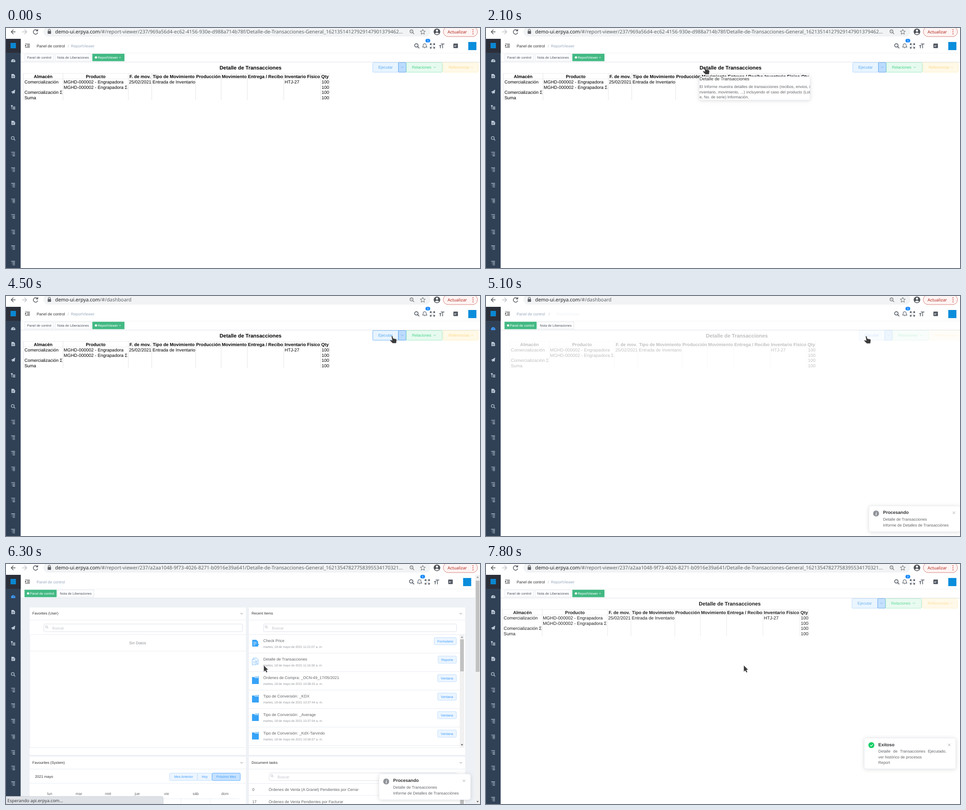
Animation of 1052x532 px, one loop 8 s. Source, as an HTML page:

```html
<!DOCTYPE html>
<html lang="es">
<head>
<meta charset="utf-8">
<title>Detalle de Transacciones</title>
<style>
  html, body { margin: 0; height: 100%; overflow: hidden; background: #fff; }
  svg { display: block; width: 1052px; height: 532px; font-family: "Liberation Sans", Arial, sans-serif; text-rendering: geometricPrecision; }
  .ui { font-family: "Noto Sans", sans-serif; }
  .para { font: 8.68px/11.6px "Liberation Sans", Arial, sans-serif; color: #606266; white-space: nowrap; }
  .para .full { text-align: justify; text-align-last: justify; white-space: normal; }
  .card { filter: drop-shadow(0 1px 4px rgba(0, 0, 0, .14)); }
</style>
</head>
<body>
<svg id="stage" viewBox="0 0 1052 532"></svg>
<script>
const BLUE = '#409eff', INK = '#303133', GREY = '#606266', SOFT = '#909399', LINE = '#e4e8f0';
const MID = 'text-anchor="middle"', BOLD = 'font-weight="700"', END = 'text-anchor="end"';

const text = (x, y, s, size = 8.68, fill = GREY, extra = '') =>
  `<text x="${x}" y="${y}" font-size="${size}" fill="${fill}" ${extra}>${s}</text>`;
const rect = (x, y, w, h, fill, stroke = 'none', rx = 0, extra = '') =>
  `<rect x="${x}" y="${y}" width="${w}" height="${h}" fill="${fill}" stroke="${stroke}" stroke-width=".8" rx="${rx}" ${extra}/>`;
const line = (d, stroke = LINE, width = .8, extra = '') =>
  `<path d="${d}" fill="none" stroke="${stroke}" stroke-width="${width}" ${extra}/>`;
const shape = (d, fill, extra = '') => `<path d="${d}" fill="${fill}" ${extra}/>`;
const circle = (x, y, r, fill, extra = '') => `<circle cx="${x}" cy="${y}" r="${r}" fill="${fill}" ${extra}/>`;
const group = (id, ...parts) => `<g id="${id}">${parts.join('')}</g>`;
const lens = (x, y, r, color, w) =>
  circle(x, y, r, 'none', `stroke="${color}" stroke-width="${w}"`) +
  line(`M${x + r * .7} ${y + r * .7}l${r} ${r}`, color, w);
const chevron = (x, y, color, r = 2.7) => line(`M${x - r} ${y - r / 2}l${r} ${r}l${r} ${-r}`, color);
const cross = (x, y, r, color) => line(`M${x - r} ${y - r}l${2 * r} ${2 * r}m0 ${-2 * r}l${-2 * r} ${2 * r}`, color);
const para = (x, y, w, ...lines) =>
  `<foreignObject x="${x}" y="${y}" width="${w}" height="60"><div class="para">${lines.join('')}</div></foreignObject>`;
const full = s => `<div class="full">${s}</div>`;

function browserBar() {
  const dark = '#5f6368';
  return rect(0, 0, 1052, 24, '#fff') + rect(83, -3, 859, 22, '#f1f3f4', 'none', 11) +
    line('M21 8.5H11.5m5-5l-5 5l5 5', '#50545a', 1.4) +
    line('M36 8.5H46m-5-5l5 5l-5 5', '#bdc1c6', 1.4) +
    line('M69.5 5.5a5 5 0 1 0 1 4.5M70.5 2.5v4h-4', '#50545a', 1.4) +
    rect(92.5, 6.5, 7.5, 6.5, dark, 'none', 1) + line('M94 7V5a2.2 2.2 0 0 1 4.5 0v2', dark, 1.1) +
    lens(900, 7.5, 3.4, dark, 1.1) + line('M898.5 7.5h3', dark) +
    line('M925 3l1.6 3.7 4 .4-3 2.7.9 4-3.5-2.1-3.5 2.1.9-4-3-2.7 4-.4z', dark, 1) +
    circle(956.5, 8.5, 7.3, '#4f5358') + circle(956.5, 6, 2.4, '#fff') + shape('M951.7 12.5q4.8-5 9.6 0q-4.8 3.5-9.6 0', '#fff') +
    rect(970.5, -2.5, 76, 21.5, '#fdf4f3', '#cf5f59', 10.7) +
    text(980, 12, 'Actualizar', 9.3, '#b3261e', 'class="ui"') +
    [4, 8.5, 13].map(y => circle(1036.5, y, 1.1, '#c5221f')).join('') +
    '<text x="109" y="12.4" font-size="10.9" class="ui" fill="#202124">demo-ui.erpya.com<tspan id="path" fill="#5f6368"></tspan></text>';
}

function sidebar() {
  const c = '#bfcbd9', y = i => 72 + i * 34.55;
  const list = i => line(`M11.5 ${y(i) - 4}h8.5m-5.5 2.7h5.5m-5.5 2.7h5.5m-5.5 2.7h5.5`, c, 1.1) +
    line(`M12.2 ${y(i) - 1.3}h1m-1 2.7h1`, c, .8);
  const page = i => shape(`M12 ${y(i) - 4.5}h5l3 3v6h-8z`, c) + line(`M13.5 ${y(i)}h5m-5 2.2h5`, '#304156');
  return rect(0, 24, 32.5, 508, '#304156') + rect(0, 24, 32.5, 31, '#2b2f3a') + rect(10, 33, 12, 12, '#0b87d1') +
    `<g id="gauge">${shape(`M11.5 ${y(0) + 3.5}a4.8 4.8 0 1 1 9 0z`, 'currentColor')}</g>` +
    line(`M16 ${y(0) + 2}l1.5-4M13 ${y(0)}h1m4 0h1`, '#304156') + page(1) +
    shape(`M20.5 ${y(2) - 4.5}l-9.5 5.5 3 1.2v3.3l2-2.4 3 1.3z`, c) +
    rect(11, y(3) - 4.5, 4, 2.6, c) + rect(15.5, y(3) - 1.2, 5, 2.2, c) + rect(15.5, y(3) + 2.4, 5, 2.2, c) +
    line(`M12.5 ${y(3) - 2}v5.5h3.500m-3.5-3.5h3.5`, c) +
    page(4) + line(`M16 ${y(4) + 4}l4.5-4`, c, 1.5) + lens(15, y(5) - 1, 3.2, c, 1.3) +
    [6, 7, 8, 9, 10, 11, 12, 13].map(list).join('');
}

function tab(x, w, label, active) {
  return rect(x, 57.4, w, 15.7, active ? '#42b983' : '#fff', active ? '#42b983' : '#d8dce5') +
    (active ? circle(x + 7.5, 65.3, 2.5, '#fff') : '') +
    text(x + (active ? 11.5 : 4.8), 68.1, label, 7.44, active ? '#fff' : '#495060');
}

function header() {
  const c = '#4d545e';
  return rect(32, 24, 1020, 52, '#fff') + line('M32 55.5H1052', '#eef0f4') + line('M32 75.5H1052', '#d8dce5') +
    line('M42.5 35.5h10.5m-6 2.5h6m-6 2.5h6m-10.5 2.5h10.5', INK, 1.2) + shape('M42.5 37v4.5l3-2.2z', INK) +
    text(68, 42.6, 'Panel de control', 8.68, INK, 'id="crumb"') +
    group('crumbLeaf', text(137, 42.6, '/', 8.68, '#b4bac4', 'id="slash"') + text(144, 42.6, 'ReportViewer', 8.68, '#97a8be', 'id="leaf"')) +
    group('tabsReport', tab(42, 63, 'Panel de control'), tab(109, 80, 'Nota de Liberaciones'),
      tab(192, 70.5, 'ReportViewer', true), cross(253, 65.5, 1.2, '#fff')) +
    group('tabsHome', tab(41.5, 70.5, 'Panel de control', true), tab(114.8, 80, 'Nota de Liberaciones')) +
    group('tools', lens(910.8, 38.5, 3.8, c, 1.6),
      line('M924.5 42.5h9.5q-1.5-1.5-1.5-4.5a3.2 3.2 0 0 0-6.5 0q0 3-1.5 4.5m3.8 1.8h2', c, 1.1),
      rect(931, 24, 10.5, 8, '#1989fa', 'none', 4),
      text(936.2, 30.2, '1', 6.2, '#fff', MID + ' id="badge"'),
      line('M941.5 38v-3.5h3.5m3 0h3.5v3.5m0 3.5v3.5h-3.5m-3 0h-3.5v-3.5M941.5 34.5l3.5 3.5m6.5-3.5l-3.5 3.5m3.5 7l-3.5-3.5m-6.5 3.5l3.5-3.5', c, 1.2),
      line('M965 35.5h8m-4 0v9.5M961.5 39h5m-2.5 0v6', c, 1.4),
      rect(993, 34.5, 10, 10, c, 'none', 1), text(994.5, 42, 'A', 6, '#fff', BOLD), text(999, 39.5, 'z', 4, '#fff'),
      rect(1026, 31, 18, 18, '#0a8ddb'));
}

function report() {
  const cols = [38.5, 126.5, 271.5, 323.5, 420.8, 477.5, 535.5, 616.5, 698.5, 717.5];
  const heads = ['Almacén', 'Producto', 'F. de mov.', 'Tipo de Movimiento', 'Producción', 'Movimiento', 'Entrega / Recibo', 'Inventario Físico', 'Qty'];
  const cell = (x, row, s, extra) => text(x, 122.9 + row * 11.6, s, 9.92, '#000', extra);
  const product = 'MGHD-000002 - Engrapadora';
  const pill = (x, w, label, fill, stroke, ink) => rect(x, 76.4, w, 21.6, fill, stroke, 2) + text(x + 12.3, 90, label, 8.68, ink);
  return text(474, 92, 'Detalle de Transacciones', 11.5, '#000', BOLD) +
    line('M38.5 100.5H717.5M38.5 113H717.5', '#e9e9e9') +
    cols.map(x => line(`M${x} 100.5V160`, '#c9c9c9', .8, 'stroke-dasharray="1.3 .8"')).join('') +
    heads.map((s, i) => text((cols[i] + cols[i + 1]) / 2, 110.6, s, 9.92, '#000', MID + ' ' + BOLD)).join('') +
    cell(41, 0, 'Comercialización') + cell(128, 0, product) + cell(273, 0, '25/02/2021') +
    cell(325.3, 0, 'Entrada de Inventario') + cell(618.5, 0, 'HTJ-27') +
    cell(128, 1, product + ' Σ') + cell(41, 2, 'Comercialización Σ') + cell(41, 3, 'Suma') +
    [0, 1, 2, 3].map(r => cell(717, r, '100', END)).join('') +
    pill(814, 57, 'Ejecutar', '#e8f4ff', '#a3d0fd', '#58a9f3') +
    rect(814, 76.4, 57, 21.6, 'none', '#3d97ee', 1, 'id="focus" stroke-dasharray="1.5 1.2"') +
    rect(871, 76.4, 17, 21.6, '#bcdcfd', '#3f92e6', 1) + chevron(879.5, 87, '#5c9fdf') +
    pill(888.7, 79.5, 'Relaciones', '#e7faf0', '#8de5b5', '#45d486') + chevron(951.5, 87, '#45d486') +
    pill(970, 78, 'Referencias', '#fff9e8', '#ffebb8', '#fcd98c') + chevron(1034.5, 87, '#fcd98c');
}

function panel(x, y, h, title) {
  return rect(x, y, 480, h, '#fff') + text(x + 6, y + 15.7, title, 8.06, INK) +
    chevron(x + 470.5, y + 13.5, GREY) + line(`M${x} ${y + 27.5}h480`);
}
const searchBox = (x, y, right) => rect(x, y, right - x, 17, '#fff', '#d5d9e1', 2.5) +
  lens(x + 5.8, y + 6, 2.3, '#a8adb6', .8) + text(x + 18.8, y + 11.6, 'Buscar', 8.4, '#c0c4cc');
const blueButton = (x, y, w, h, label, on) => rect(x, y, w, h, on ? '#c6e2ff' : '#ecf5ff', on ? BLUE : '#b3d8ff', 2) +
  text(x + w / 2, y + h / 2 + 2.7, label, 7.44, BLUE, MID);

function itemIcon(kind, y) {
  const c = '#36a3f7', pale = '#7dbdf8';
  if (kind === 'Ventana')
    return shape(`M546 ${y + 12}h6v2h9v13.5h-15z`, c) + rect(553.5, y + 11, 3, 2, c) + rect(558, y + 11, 3, 2, c);
  if (kind === 'Formulario')
    return shape(`M546.5 ${y + 11.5}h9l4 4v11h-13z`, c) + line(`M549 ${y + 17}h7m-7 3h7m-7 3h4`, '#fff', 1.2) + line(`M556 ${y + 26}l5-5`, c, 2);
  return line(`M548.5 ${y + 13.5}v-2.5h8l3 3v11h-4M546.5 ${y + 14}h6l2 2v10h-8zM548.5 ${y + 19}h4m-4 3h4`, pale, 1) +
    circle(557.5, y + 20, 2.6, '#fff', `stroke="${pale}"`);
}

function recentItem([title, time, kind, w], i) {
  const y = 156.5 + i * 41;
  return (i === 1 ? rect(539, y, 468, 41, '#f5f7fa', 'none', 0, 'id="hoverRow"') : '') + itemIcon(kind, y) +
    text(571, y + 16.5, title) + text(571, y + 29.6, `martes, 18 de mayo de 2021 ${time} a. m.`, 6.82, SOFT) +
    blueButton(999.5 - w, y + 6.5, w, 16, kind) + line(`M539 ${y + 41}h468`);
}

function scrollbar(x, top, bottom, w, from, to) {
  const mid = x + w / 2;
  return rect(x, top, w, bottom - top, '#f1f1f1') + rect(x + 1, from, w - 2, to - from, '#c1c1c1') +
    shape(`M${mid - 2.5} ${top + 6.5}h5l-2.5-3z`, '#8a8a8a') + shape(`M${mid - 2.5} ${bottom - 6.5}h5l-2.5 3z`, '#505050');
}

function dashboard() {
  const items = [
    ['Check Price', '11:21:07', 'Formulario', 49], ['Detalle de Transacciones', '11:16:30', 'Reporte', 40.5],
    ['Órdenes de Compra: _OCN-49_17/05/2021', '10:38:33', 'Ventana', 41.5], ['Tipo de Conversión: _KDX', '10:37:44', 'Ventana', 41.5],
    ['Tipo de Conversión: _Average', '10:37:04', 'Ventana', 41.5], ['Tipo de Conversión: _KdX-Tarvindo', '10:36:07', 'Ventana', 41.5]];
  const days = ['lun', 'mar', 'mié', 'jue', 'vie', 'sáb', 'dom'];
  const day = (d, i) => text(97 + i * 64.8, 512, d, 8.4, GREY, MID) + line(`M${64.5 + i * 64.8} 540v-19.5h64.8`);
  return rect(0, 76, 1052, 456, '#eef1f5') +
    panel(52.5, 96.5, 326.5, 'Favorites (User)') + searchBox(84, 133, 525) +
    line('M53 156.5H532M53 193H532M53 407H532M53 156.5V407') + text(292, 178, 'Sin Datos', 8.68, SOFT, MID) +
    panel(539, 96.5, 326.5, 'Recent Items') + searchBox(571.5, 133, 1000) + line('M539 156.5H1019M539 407H1019') +
    items.map(recentItem).join('') + scrollbar(1007, 157, 406, 10, 167, 238) +
    panel(52.5, 427, 120, 'Favourites (System)') + text(64.5, 474.3, '2021 mayo', 8.1, INK) +
    blueButton(363, 463.5, 62, 16.5, 'Mes Anterior') + blueButton(425, 463.5, 32, 16.5, 'Hoy') + blueButton(457.5, 463.5, 62.5, 16.5, 'Próximo Mes', true) +
    line('M53 486H532') + days.map(day).join('') +
    panel(539, 427, 120, 'Document tasks') + searchBox(584, 463, 1000) + line('M539 486.5H1019M539 513H1019') +
    text(546.5, 503, '0') + text(583, 503, 'Órdenes de Venta (A Granel) Pendientes por Cerrar') +
    text(546.5, 529.5, '17') + text(583, 529.5, 'Órdenes de Venta Pendientes por Facturar') +
    scrollbar(1007, 487, 640, 10, 497, 540);
}

// Cards are drawn from their own top left corner.
const card = (h, title, icon, ...lines) =>
  rect(0, 0, 203, h, '#fff', '#ebeef5', 5, 'class="card"') + icon + text(31.3, 17.6, title, 9.92, INK, BOLD) +
  cross(188.5, 15, 2.7, SOFT) + para(31.3, 23.3, 151, ...lines);
const infoIcon = circle(15.8, 16.5, 6.6, SOFT) + text(16, 20.6, 'i', 11, '#fff', MID + ' font-family="Liberation Serif, serif" font-style="italic" ' + BOLD);
const okIcon = circle(15.8, 15.5, 6.6, '#13ce66') + line('M13 15.5l2.2 2.2 4-4', '#fff', 1.3);
const gap = s => `<div style="line-height:12.4px">${s}</div>`;

document.getElementById('stage').innerHTML =
  '<clipPath id="main"><rect x="32" y="76" width="1020" height="456"/></clipPath>' +
  rect(0, 0, 1052, 532, '#fff') +
  `<g clip-path="url(#main)">${group('report', report())}${group('dashboard', dashboard())}</g>` +
  header() +
  group('popover', rect(473.5, 107.5, 245.5, 52, '#fff', '#ebeef5', 1, 'class="card"'),
    text(474, 116, 'Detalle de Transacciones', 9.85, INK),
    para(474, 125, 245.5, full('El Informe muestra detalles de transacciones (recibos, envios, i'),
      full('nventario, movimiento, ...) incluyendo el caso del producto (Lot'), 'e, No. de serie) Información.')) +
  group('running', card(57, 'Procesando', infoIcon, gap('Detalle de Transacciones'), gap('Informe de Detalles de Transacciónes'))) +
  group('success', card(68, 'Exitoso', okIcon, gap(full('Detalle de Transacciones Ejecutado,')), gap('ver histórico de procesos'), gap('Report'))) +
  rect(32, 23.5, 1009, 1.5, '#29a3e8', 'none', 0, 'id="progress"') +
  group('scroll', scrollbar(1041.5, 24, 532, 10.5, 37, 239)) +
  sidebar() + browserBar() +
  group('status', shape('M0 515H345q4 0 4 4V532H0z', '#dee1e6', 'stroke="#c4c8ce" stroke-width=".6"'), text(3, 527.5, 'Esperando api.erpya.com...', 9.72, '#3c4043', 'class="ui"')) +
  group('cursor',
    shape('M0 0V14.5L3.3 11.7L5.8 16.3L8.3 15L6 10.5L10 10z', '#3a3a3a', 'id="arrow" stroke="#fff" stroke-width=".5"'),
    shape('M-2.5 1.2Q-1.5-.6 0 1L1.5 6L7.5 7.2Q9.3 8 9 10L8 16.8H0L-5.5 11Q-6 9.3-4 9.2L-1 10.5z', '#3a3a3a', 'id="hand" stroke="#fff" stroke-width=".5"'));

const $ = id => document.getElementById(id);
const show = (id, opacity, x = 0, y = 0) => {
  $(id).style.display = opacity ? '' : 'none';
  $(id).setAttribute('opacity', +opacity);
  $(id).setAttribute('transform', `translate(${x} ${y})`);
};
// Value of the last step that has begun; each step is [start, ...values].
const step = (t, steps) => steps.filter(s => s[0] <= t).pop().slice(1);

const PATHS = [
  '/#/report-viewer/237/969a56d4-ec62-4156-930e-d988a714b78f/Detalle-de-Transacciones-General_16213514127929147901379462...',
  '/#/dashboard',
  '/#/report-viewer/237/a2aa1048-9f73-4026-8271-b0916e39a641/Detalle-de-Transacciones-General_16213547827758395534170321...'];
const POINTER = [[0, 230, 70, 0], [2100, 487, 86, 1], [2300, 534, 92, 1], [2500, 496, 96, 1], [2700, 828, 67, 0], [3100, 829, 71, 0],
  [3400, 837, 89, 1], [3700, 844, 89, 1], [3900, 858, 88, 1], [5100, 845, 88.5, 1], [5600, 844, 89, 0], [6300, 572, 224.5, 0], [6600, 572, 224.5, 1], [7400, 572, 224.5, 0]];

function pointerAt(t) {
  if (t >= 1300) return step(t, POINTER);
  const u = Math.floor((t - 500) / 100) / 7, eased = 1 - (1 - u) ** 2;
  return [173 + 59 * eased, 109 - 44 * eased, 0];
}

function draw(t) {
  const home = t >= 5100 && t < 6900, narrow = t >= 5900 && t < 7800;
  $('path').textContent = PATHS[step(t, [[0, 0], [4500, 1], [6300, 2]])[0]];

  show('report', ...step(t, [[0, 1, 0], [5100, .25, 14], [5300, 0], [7800, .88, -1.7]]));
  show('focus', t >= 3400 && t < 5100);
  show('popover', ...step(t, [[0, 0], [2100, 1], [2900, .5], [3100, 0]]));
  show('dashboard', ...step(t, [[0, 0], [5900, .85, -6], [6300, 1, 0], [6900, .25, 13.5], [7200, 0]]));
  show('hoverRow', t >= 6600);

  show('tabsHome', home);
  show('tabsReport', !home);
  $('crumb').setAttribute('fill', home ? '#97a8be' : INK);
  show('crumbLeaf', t < 5900 || t >= 6900);
  show('slash', 1, t >= 5100 && t < 5900 ? 2 : 0);
  show('leaf', ...step(t, [[0, 1, 0], [5100, .15, 11.5], [6900, .85, 3.5], [7200, 1, 0]]));
  $('gauge').style.color = home ? BLUE : '#bfcbd9';
  show('tools', 1, narrow ? -11.5 : 0);
  $('badge').textContent = t < 6900 ? 1 : 2;
  show('scroll', narrow);
  show('progress', ...step(t, [[0, 0], [6600, 1, -28], [6900, .4, 0], [7200, 0]]));

  show('running', ...step(t, [[0, 0], [5100, 1, 850, 465.5], [5300, 1, 839.5, 465.5], [5900, 1, 828, 465.5], [6900, 0]]));
  show('success', ...step(t, [[0, 0], [6900, 1, 851.5, 386], [7200, 1, 828, 386], [7800, 1, 839.5, 386]]));
  show('status', t >= 6300 && t < 6600);

  const [x, y, hand] = pointerAt(t);
  show('cursor', t >= 500, x, y);
  show('hand', hand);
  show('arrow', !hand);
}

const start = performance.now();
(function loop() {
  draw((performance.now() - start) % 8000);
  requestAnimationFrame(loop);
})();
</script>
</body>
</html>
```
